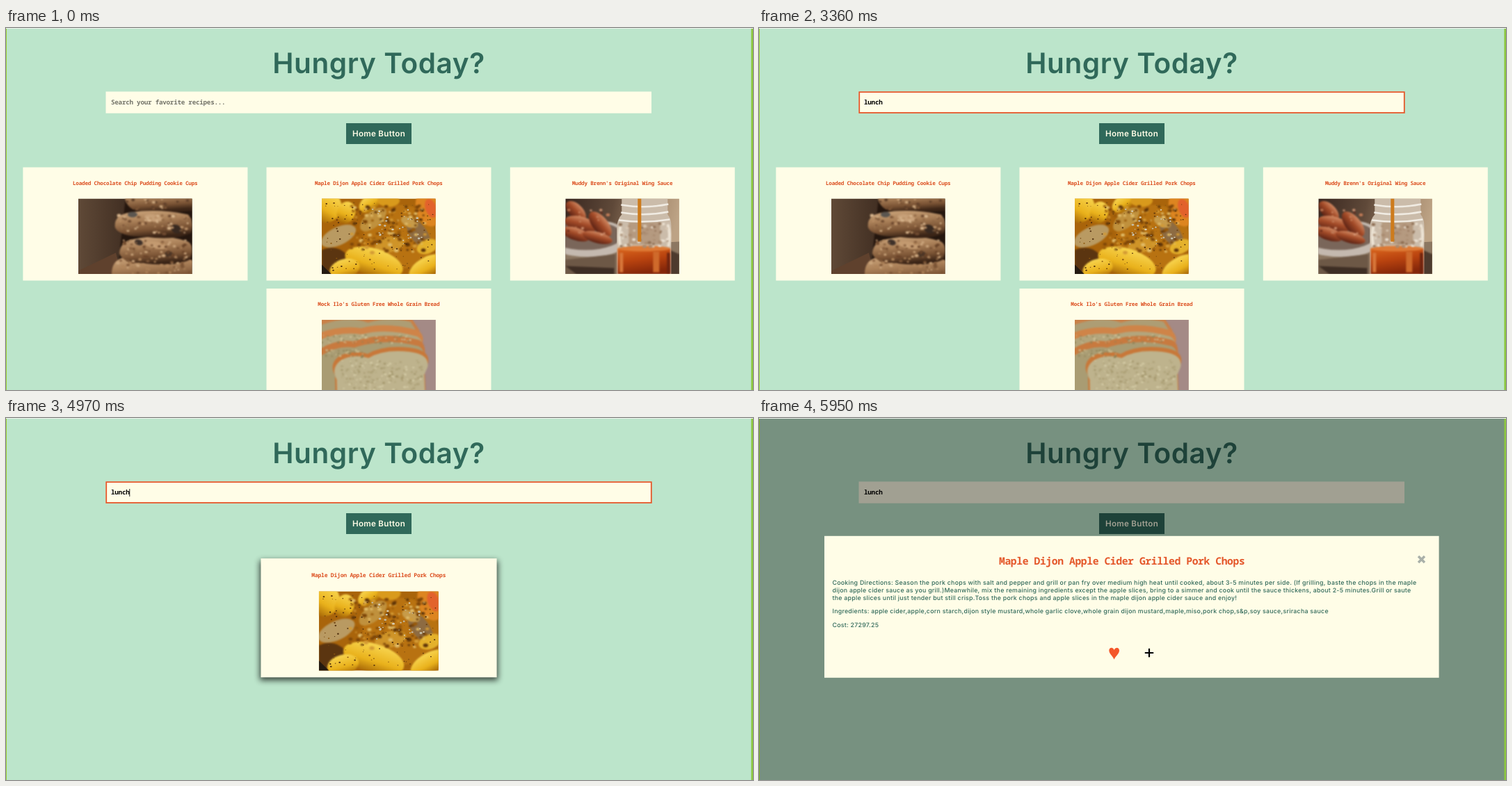
An HTML page that plays this animation: 1074 by 521 pixels, repeating every 8000 ms.

```html
<!DOCTYPE html>
<html lang="en">
<head>
<meta charset="utf-8">
<title>Recipe search</title>
<style>
  html, body { margin: 0; width: 100%; height: 100%; overflow: hidden; background: #bce5cb; }
  svg { display: block; }
  text { text-rendering: geometricPrecision; font-family: Inter, sans-serif; fill: #30695a; }
  .mid { text-anchor: middle; }
  .mono { font-family: "Noto Sans Mono", monospace; font-weight: 700; white-space: pre; }
  .heading { font-size: 40.5px; font-weight: 600; letter-spacing: .6px; }
  .button { font-size: 11.6px; font-weight: 600; letter-spacing: .3px; fill: #fffde7; }
  .name { font-size: 7.6px; letter-spacing: -.18px; fill: #dc4f20; }
  .query { font-size: 9.2px; letter-spacing: -.21px; }
  .dish { font-size: 14.7px; letter-spacing: -.4px; fill: #e4572a; }
  .body { font-size: 8.8px; font-weight: 500; letter-spacing: .26px; }
  .shadow { filter: blur(4px); }
  .soft { filter: blur(.8px); }
</style>
</head>
<body>
<svg id="stage" width="1074" height="521" viewBox="0 0 1074 521">
  <defs>
    <clipPath id="frame"><rect width="163.6" height="108.6"/></clipPath>
    <linearGradient id="wall"><stop stop-color="#5f4937"/><stop offset=".38" stop-color="#443124"/><stop offset="1" stop-color="#20150f"/></linearGradient>
    <linearGradient id="cookie" x2=".25" y2="1"><stop stop-color="#d0aa80"/><stop offset=".4" stop-color="#ab8159"/><stop offset=".75" stop-color="#7a5334"/><stop offset="1" stop-color="#3a2416"/></linearGradient>
    <linearGradient id="apple" x2="0" y2="1"><stop stop-color="#f8d550"/><stop offset=".6" stop-color="#e9b11b"/><stop offset="1" stop-color="#a96a08"/></linearGradient>
    <linearGradient id="sauce" x2=".3" y2="1"><stop stop-color="#d9641c"/><stop offset=".5" stop-color="#b9430f"/><stop offset="1" stop-color="#85270a"/></linearGradient>
    <linearGradient id="room" x2="1" y2=".15"><stop stop-color="#38261f"/><stop offset=".42" stop-color="#5f4939"/><stop offset=".75" stop-color="#a08468"/><stop offset="1" stop-color="#bda385"/></linearGradient>
    <linearGradient id="wing" x2="0" y2="1"><stop stop-color="#d28a63"/><stop offset=".45" stop-color="#a34b28"/><stop offset="1" stop-color="#5b2214"/></linearGradient>
  </defs>
  <rect width="1074" height="521" fill="#bce5cb"/>
  <text class="heading mid" x="536" y="65">Hungry Today?</text>

  <rect x="143.5" y="91.5" width="784.5" height="31.2" fill="#fffde7"/>
  <rect id="ring" x="144.2" y="92.200" width="783.600" height="29.800" fill="none" stroke="#e4572a" stroke-width="1.800"/>
  <text id="query" class="mono query" x="151" y="110"></text>
  <rect id="caret" y="102" width="1" height="11" fill="#222"/>

  <rect x="489" y="137" width="94" height="30" fill="#30695a"/>
  <text class="button mid" x="536" y="156">Home Button</text>
  <g id="cards"></g>

  <g id="modal">
    <rect y="1" width="1072" height="520" opacity=".37"/>
    <rect x="94" y="169.8" width="883.6" height="204" fill="#fffde7"/>
    <text class="mono dish mid" x="521.7" y="210.5">Maple Dijon Apple Cider Grilled Pork Chops</text>
    <path d="M948 199l9 9m0-9l-9 9" stroke="#a9b0a9" stroke-width="3.4"/>
    <g id="details"></g>
    <path d="M510.6 347.500C508 342 503.300 339 503.300 334.500C503.300 329.500 509.300 329.500 510.600 334C512 329.500 518 329.500 518 334.500C518 339 513.200 342 510.600 347.500Z" fill="#f4572a"/>
    <path d="M554.8 338h12.400m-6.200-6.200v12.400" stroke="#000" stroke-width="2.200"/>
  </g>
  <path d="M0 .5H1074" stroke="#eef3ee"/>
  <path id="edge" d="M.5 1V521" stroke="#9acd32"/>
  <path d="M1072.700 1V521" stroke="#8cc63f" stroke-width="2.600"/>
</svg>
<script>
const $ = id => document.getElementById(id);

function random(seed) {
  return () => (seed = (seed * 16807) % 2147483647) / 2147483647;
}

function specks(seed, count, [x, y, w, h], size, colors) {
  const next = random(seed);
  return Array.from({ length: count }, () => {
    const color = colors[Math.floor(next() * colors.length)];
    const r = size * (.4 + next() * .6);
    return `<ellipse cx="${x + next() * w}" cy="${y + next() * h}" rx="${r}" ry="${r * .75}" fill="${color}"/>`;
  }).join('');
}

const oval = (x, y, rx, ry, fill, turn = 0) =>
  `<ellipse cx="${x}" cy="${y}" rx="${rx}" ry="${ry}" fill="${fill}" transform="rotate(${turn} ${x} ${y})"/>`;
const box = (x, y, w, h, fill, r = 0) =>
  `<rect x="${x}" y="${y}" width="${w}" height="${h}" rx="${r}" fill="${fill}"/>`;
const shape = (d, fill, extra = '') => `<path d="${d}" fill="${fill}" ${extra}/>`;
const soft = content => `<g class="soft">${content}</g>`;

function cookies() {
  return box(0, 0, 164, 109, 'url(#wall)') +
    shape('M0 109V104L54 78L62 109Z', '#5f412d') +
    soft(shape('M68 0H170V109H56Z', '#24160e') +
      shape('M66 -12H170V17Q120 22 84 17Q66 14 66 -12Z', 'url(#cookie)') +
      shape('M48 109Q48 88 66 85Q110 78 170 90V130H48Z', 'url(#cookie)') +
      shape('M59 79Q60 61 82 58Q124 50 158 62Q168 69 161 88Q136 99 92 93Q64 93 59 79Z', 'url(#cookie)') +
      shape('M53 42Q50 24 74 20Q116 14 158 23Q168 36 162 50Q136 61 96 55Q60 55 53 42Z', 'url(#cookie)') +
      oval(78, 23, 7, 4, '#5b5650') + oval(87, 63, 6, 4, '#3d3029', 20) +
      oval(141, 44, 8, 6, '#382920', 30) + oval(130, 80, 6, 4, '#4c3626') +
      oval(108, 28, 13, 5, '#c7a078', 10) + oval(112, 67, 16, 5, '#c39a70', 10)) +
    soft(specks(8, 75, [58, 24, 102, 27], 3, ['#d6b48c', '#6f4a30', '#b98f66', '#8d6643']) +
      specks(5, 70, [65, 60, 94, 29], 3, ['#cba67d', '#6a4429', '#b0855b', '#8a6240']) +
      specks(3, 45, [56, 88, 108, 20], 3, ['#cba67d', '#7c5536', '#b0855b']) +
      specks(6, 25, [70, 0, 92, 15], 3, ['#cba67d', '#7c5536', '#5a3c27']));
}

function pork() {
  return box(0, 0, 164, 109, '#a9640b') +
    soft(oval(112, 55, 52, 46, '#b87211') +
      oval(24, 54, 27, 13, '#b99a62', -25) + oval(74, 30, 23, 11, '#c0913d', -40) +
      oval(8, 13, 20, 22, 'url(#apple)', 30) + oval(35, 20, 13, 16, 'url(#apple)', 20) +
      oval(69, 7, 17, 11, 'url(#apple)', -35) + oval(96, 3, 16, 9, '#d99a1c') +
      oval(153, 15, 17, 26, '#dd8520', -20) + oval(157, 14, 8, 14, '#e2622c', -20) +
      oval(139, 50, 12, 26, '#8d6b42', -35) + oval(126, 34, 13, 7, '#c79b49', 25) +
      oval(98, 66, 22, 11, '#cf9428', -15) +
      shape('M0 74Q22 65 36 81L22 109H0Z', '#5b3510') +
      oval(75, 92, 43, 20, 'url(#apple)', 17) + oval(33, 101, 22, 14, 'url(#apple)', -15) +
      oval(152, 98, 29, 14, 'url(#apple)', -28) + oval(152, 69, 16, 10, '#e4b12b', -20)) +
    soft(specks(17, 130, [42, 10, 108, 68], 3.4, ['#7d4608', '#d39a34', '#e0bb68', '#985a0b', '#5f3509'])) +
    specks(29, 120, [4, 5, 156, 100], 1.4, ['#4b2a0b', '#6d410d', '#8f590f']) +
    specks(41, 32, [70, 14, 75, 52], 1.9, ['#d9d1ba', '#c6c0ac']) +
    shape('M0 95L14 109H0Z', '#241a10');
}

function jar() {
  return box(0, 0, 164, 109, 'url(#room)') +
    shape('M0 70L164 62V109H0Z', '#8c7761') +
    soft(oval(33, 57, 62, 27, '#c4b9af') + oval(29, 53, 53, 21, '#7a665a') +
      oval(15, 18, 18, 10, 'url(#wing)', 45) + oval(22, 37, 24, 11, 'url(#wing)', 15) +
      oval(50, 37, 22, 11, 'url(#wing)', 50) + oval(15, 51, 21, 9, 'url(#wing)', 18) +
      oval(46, 56, 22, 8, 'url(#wing)', 15) +
      specks(19, 16, [4, 14, 58, 40], 3, ['#d79a78', '#66281a', '#c07a56']) +
      shape('M0 88L72 80V109H0Z', '#6d5846') + shape('M0 97L70 100V109H16Z', '#3e2e24') +
      shape('M150 74L164 80V109H150Z', '#4d3a2d')) +
    shape('M81 0H147V23Q153 30 152 43V109H74V43Q74 30 81 23Z', '#cbbcaa') +
    soft(shape('M75 72H151V109H75Z', 'url(#sauce)') + oval(113, 72, 38, 4, '#dd7a35') +
      shape('M79 40Q76 55 79 69M147 37Q152 50 148 69', 'none', 'stroke="#eee5d6" stroke-width="4"') +
      shape('M91 34H136V66H91Z', '#b59a80')) +
    shape('M80 9Q114 15 148 8M80 20Q114 26 148 19M77 31Q114 36 150 30', 'none', 'stroke="#f0ebe2" stroke-width="2.500"') +
    soft(specks(13, 55, [78, 36, 70, 33], 3, ['#ece2d3', '#a98b70', '#d6c5b0', '#8d6d52'])) +
    box(104, 0, 5, 62, '#cd7b1c') +
    soft(box(78, 78, 5, 28, '#d7773a') + box(126, 76, 9, 30, '#cf6a2b') + box(146, 78, 4, 30, '#6c2410'));
}

function bread() {
  const slice = (d, crust, crumb, depth) =>
    shape(d, crust) + shape(d, crumb, `transform="translate(3 ${depth}) scale(.975 1)"`);
  return box(0, 0, 164, 109, '#b08b7c') +
    shape('M130 0H164V109H150Z', '#a48a86') + shape('M0 70L24 109H0Z', '#8d6a52') +
    soft(slice('M-9 60V2Q34 -14 65 -3Q95 -12 128 -4L141 16L110 48Z', '#c98048', '#ad9d74', 7) +
      slice('M-9 74V21Q24 7 56 12Q92 2 138 15Q150 23 143 40L85 66Z', '#cf8448', '#b3a57c', 9) +
      slice('M-9 106V46Q18 27 45 31Q92 16 140 29Q152 35 147 60L70 93Z', '#c87a3f', '#a99c73', 9) +
      slice('M20 119L19 80Q10 64 24 53Q42 42 66 49Q88 36 126 40Q156 43 153 62L148 73L150 119Z', '#c87839', '#beb38d', 6)) +
    soft(specks(23, 190, [28, 58, 116, 51], 2.2, ['#a3966c', '#d4cba6', '#ada178']) +
      specks(31, 70, [0, 22, 128, 12], 1.8, ['#8d8054', '#cfc298']) +
      specks(37, 45, [0, 42, 60, 12], 1.8, ['#8d8054', '#c9bd92']));
}

const cards = [
  { x: 24.4, y: 200.5, name: 'Loaded Chocolate Chip Pudding Cookie Cups', photo: cookies },
  { x: 374.5, y: 200.5, name: 'Maple Dijon Apple Cider Grilled Pork Chops', photo: pork },
  { x: 724.8, y: 200.5, name: "Muddy Brenn's Original Wing Sauce", photo: jar },
  { x: 374.5, y: 375, name: "Mock Ilo's Gluten Free Whole Grain Bread", photo: bread }
];

$('cards').innerHTML = cards.map(({ x, y, name, photo }) => `
  <g transform="translate(${x} ${y})">
    <rect class="shadow" x="-1.5" y="3" width="326" height="164" opacity="0"/>
    ${box(0, 0, 323, 163, '#fffde7')}
    <text class="mono name mid" x="161.3" y="25.3">${name}</text>
    <g transform="translate(79.5 45)" clip-path="url(#frame)">${photo()}</g>
  </g>`).join('');

const details = [
  [240.3, 'Cooking Directions: Season the pork chops with salt and pepper and grill or pan fry over medium high heat until cooked, about 3-5 minutes per side. (If grilling, baste the chops in the maple'],
  [250.9, 'dijon apple cider sauce as you grill.)Meanwhile, mix the remaining ingredients except the apple slices, bring to a simmer and cook until the sauce thickens, about 2-5 minutes.Grill or saute'],
  [261.5, 'the apple slices until just tender but still crisp.Toss the pork chops and apple slices in the maple dijon apple cider sauce and enjoy!'],
  [281.3, 'Ingredients: apple cider,apple,corn starch,dijon style mustard,whole garlic clove,whole grain dijon mustard,maple,miso,pork chop,s&amp;p,soy sauce,sriracha sauce'],
  [300.8, 'Cost: 27297.25']
];
$('details').innerHTML = details.map(([y, line]) => `<text class="body" x="105.5" y="${y}">${line}</text>`).join('');

const LOOP = 8000;
const keyTimes = [2240, 2450, 2590, 2800, 2870];
const caretOn = [[1400, 1890], [2240, 3360], [3920, 4410], [4970, 5530]];
const hoverSteps = [[0, 0], [4620, .2], [4690, .6], [4760, .9], [4830, 1], [5880, .4], [5950, 0]];
const groups = [...$('cards').children];
const porkCard = groups[1];
const show = (node, on) => node.setAttribute('visibility', on ? 'visible' : 'hidden');

function draw(t) {
  const typed = keyTimes.filter(time => t >= time).length;
  $('query').textContent = typed ? 'lunch'.slice(0, typed) : 'Search your favorite recipes...';
  $('query').style.fill = typed ? '#000' : '#74746a';
  $('caret').setAttribute('x', 151 + typed * 5.25);
  show($('caret'), caretOn.some(([from, to]) => t >= from && t < to));
  show($('ring'), t >= 1400 && t < 5670);

  const filtered = t >= 3850;
  groups.forEach(group => show(group, group === porkCard || !filtered));
  const hover = hoverSteps.filter(([time]) => t >= time).pop()[1];
  const y = filtered ? 206.2 : 200.5;
  porkCard.setAttribute('transform',
    `translate(536 ${y + 81.5}) scale(${1 + .05 * hover}) translate(-161.5 -81.5)`);
  porkCard.firstElementChild.setAttribute('opacity', .7 * hover);

  const open = t >= 5880;
  show($('modal'), open);
  $('edge').setAttribute('stroke', open ? '#7fae24' : '#9acd32');
}

function tick() {
  draw(performance.now() % LOOP);
  requestAnimationFrame(tick);
}
tick();
</script>
</body>
</html>
```
